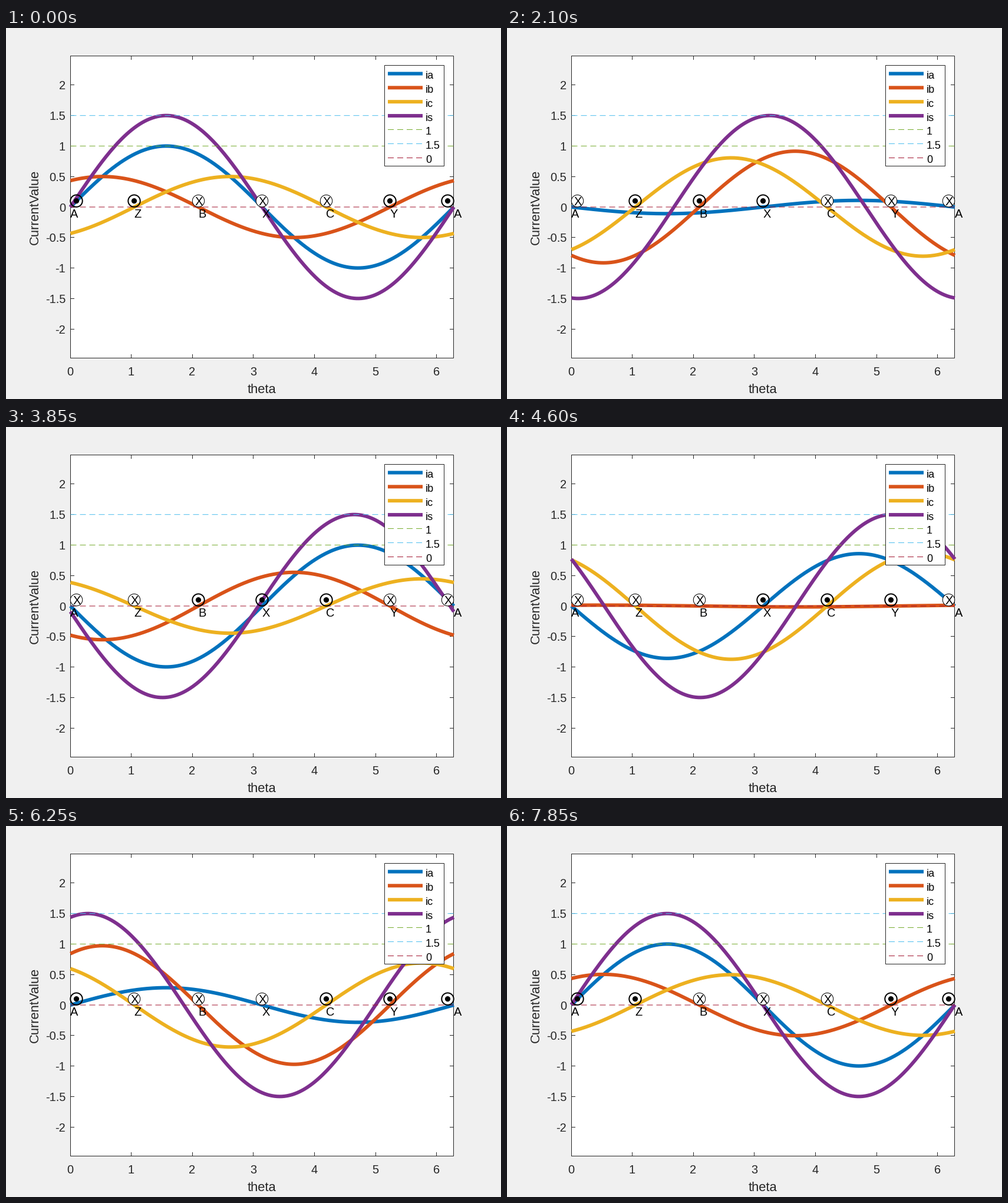
Animation of 840 by 630 pixels, one loop 7900 ms. Source, as a matplotlib script:

```python
import numpy as np
import matplotlib.pyplot as plt
from matplotlib.animation import FuncAnimation
from matplotlib.patches import Circle, Rectangle

W, H, DPI = 840, 630, 100
FRAMES, INTERVAL, STEP = 158, 50, 0.04
PX = 72 / DPI  # points per pixel

LEFT, RIGHT, TOP, BOTTOM = 109.5, 759.5, 47.5, 560.5  # frame lines
X0, X1 = 109.3, 760  # theta = 0 and theta = 2 pi
SCALE = (X1 - X0) / (2 * np.pi)
MID = (TOP + BOTTOM) / 2
INK = "#262626"
BLUE, ORANGE, YELLOW, PURPLE = "#0072BD", "#D95319", "#EDB120", "#7E2F8E"
GREEN, CYAN, MAROON = "#77AC30", "#4DBEEE", "#A2142F"

plt.rcParams["font.family"] = "Liberation Sans"
fig = plt.figure(figsize=(W / DPI, H / DPI), dpi=DPI, facecolor="#F0F0F0")
ax = fig.add_axes([0, 0, 1, 1])
ax.set_xlim(0, W)
ax.set_ylim(H, 0)
ax.axis("off")


def px(theta):
    return X0 + SCALE * theta


def py(value):
    return MID - SCALE * value


def crisp(v):
    """Centre of the pixel that holds v."""
    return np.floor(v) + 0.5


def line(xs, ys, color, width=1, z=1, **kw):
    return ax.plot(xs, ys, color=color, lw=width * PX, zorder=z, snap=False,
                   solid_capstyle="butt", dash_capstyle="butt", **kw)[0]


def label(x, y, s, size=20, color=INK, z=2, ha="center", **kw):
    return ax.text(x, y, s, fontsize=size * PX, color=color, zorder=z,
                   ha=ha, va="baseline", **kw)


def box(x0, y0, x1, y1, z):
    ax.add_patch(Rectangle((x0, y0), x1 - x0, y1 - y0, fc="white", ec=INK,
                           lw=PX, zorder=z, snap=False))


def dashed(x0, x1, y, color, z):
    line([x0, x1], [y, y], color, z=z, ls=(0, (10, 6)))


# Axes frame, ticks and captions
box(LEFT, TOP, RIGHT, BOTTOM, 0)
TICK = 6.5
for k in range(7):
    x = crisp(px(k))
    line([x, x], [BOTTOM, BOTTOM - TICK], INK)
    line([x, x], [TOP, TOP + TICK], INK)
    label(px(k) - 0.5, 590, str(k))
for v in np.arange(-2, 2.1, 0.5):
    y = crisp(py(v))
    line([LEFT, LEFT + TICK], [y, y], INK)
    line([RIGHT, RIGHT - TICK], [y, y], INK)
    label(101, py(v) + 7.5, f"{v:g}", ha="right")
label((LEFT + RIGHT) / 2, 620, "theta", 22)
label(55, MID, "CurrentValue", 22, rotation=90, rotation_mode="anchor")

# Curves and reference levels
theta = np.linspace(0, 2 * np.pi, 300)
curves = [line(px(theta), py(0 * theta), c, 6, 3)
          for c in (BLUE, ORANGE, YELLOW, PURPLE)]
levels = [(1, GREEN), (1.5, CYAN), (0, MAROON)]
for v, c in levels:
    dashed(LEFT, RIGHT, py(v), c, 4)

# Legend
box(642.5, 63.5, 743.5, 234.5, 10)
names = ["ia", "ib", "ic", "is"] + [f"{v:g}" for v, _ in levels]
colors = [BLUE, ORANGE, YELLOW, PURPLE] + [c for _, c in levels]
for i, (name, c) in enumerate(zip(names, colors)):
    y = 77.5 + 23.85 * i
    if i < 4:
        line([648, 707], [y, y], c, 6, 11)
    else:
        dashed(648, 707, crisp(y), c, 11)
    label(712, y + 8.5, name, 18, "black", 11, "left")


class Coil:
    """Conductor symbol: dot for current out, cross for current in."""

    def __init__(self, name, spot, at, phase, sign):
        self.phase, self.sign = phase, sign
        x, y = crisp(px(spot)), py(0.1)
        self.ring = Circle((x, y), 10.2, ec="black", zorder=6)
        self.dot = Circle((x, y), 4.6, fc="black", ec="none", zorder=7)
        ax.add_patch(self.ring)
        ax.add_patch(self.dot)
        self.cross = label(x + 0.3, y + 7.3, "X", 20, "black", 7)
        label(px(at) - 0.3, py(-0.1) + 7.5, name, 20, "black", 8, "left")

    def update(self, t):
        out = self.sign * np.cos(t - self.phase) > 0
        self.ring.set_linewidth((2 if out else 1) * PX)
        self.ring.set_facecolor("none" if out else "white")
        self.dot.set_visible(out)
        self.cross.set_visible(not out)


THIRD = 2 * np.pi / 3
PHASES = [0, THIRD, 2 * THIRD]
coils = []
for k, (name, p, sign) in enumerate([("A", 0, 1), ("Z", 2, -1), ("B", 1, 1),
                                     ("X", 0, -1), ("C", 2, 1), ("Y", 1, -1),
                                     ("A", 0, 1)]):
    at = k * np.pi / 3
    spot = np.clip(at, 0.1, 2 * np.pi - 0.1)
    coils.append(Coil(name, spot, at, PHASES[p], sign))


def update(i):
    t = i * STEP
    waves = [np.cos(t - p) * np.sin(theta - p) for p in PHASES]
    for curve, wave in zip(curves, waves + [sum(waves)]):
        curve.set_ydata(py(wave))
    for coil in coils:
        coil.update(t)
    return curves


anim = FuncAnimation(fig, update, frames=FRAMES, interval=INTERVAL,
                     repeat=True, repeat_delay=0, blit=False)
plt.show()
```
